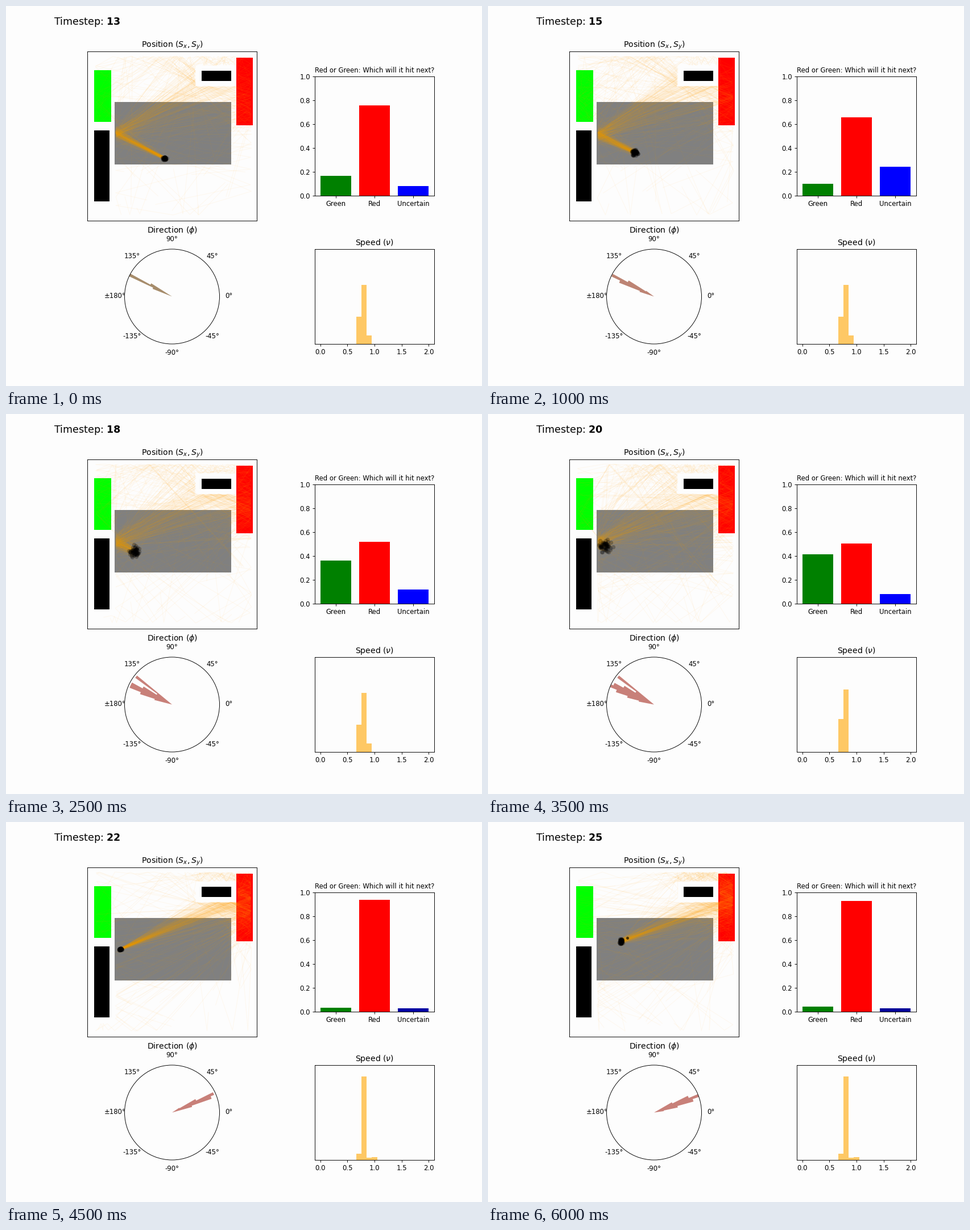
Write a matplotlib script that moves like this. It is 837 px wide and 669 px high and loops after 6500 ms.

```python
import numpy as np
import matplotlib.pyplot as plt
from matplotlib.animation import FuncAnimation
from matplotlib.collections import LineCollection
from matplotlib.patches import Circle, Polygon, Rectangle

W, H, DPI = 837, 669, 72  # at 72 dpi one point is one pixel
PT = 0.837 * 100 / 72     # size of a layout point in pixels
PAPER = "#fdfdfd"
FIRST, STEPS = 13, 13
REBOUND = 22              # first step after the ball has left the block
BIN = 3.6                 # width of a direction bin in degrees
HUB, RADIUS = np.array([292, 511.5]), 83.5

# Walls and obstacles, grown by the ball's radius.
LEFT, TOP, RIGHT, BOTTOM = 157, 88, 432, 368
BLOCKS = [(140, 202, 192, 354), (334, 105, 406, 141)]

# Key points of the predicted chances.
KEYS = [13, 15, 16, 18, 20, 22, 25]
GREEN = [.166, .102, .127, .363, .413, .031, .043]
RED = [.755, .656, .838, .520, .504, .939, .928]

plt.rcParams.update({
    "font.family": "DejaVu Sans",
    "font.size": 10 * PT,
    "axes.linewidth": 0.8 * PT,
    "axes.facecolor": PAPER,
    "xtick.major.size": 3.5 * PT, "ytick.major.size": 3.5 * PT,
    "xtick.major.width": 0.8 * PT, "ytick.major.width": 0.8 * PT,
    "xtick.major.pad": 3.5 * PT, "ytick.major.pad": 3.5 * PT,
})


def panel(x0, y0, x1, y1, xlim=None, ylim=None):
    ax = fig.add_axes([x0 / W, 1 - y1 / H, (x1 - x0) / W, (y1 - y0) / H])
    ax.set_xlim(xlim or (x0, x1))
    ax.set_ylim(ylim or (y1, y0))
    return ax


def label(x, y, text, size=10, **kw):
    return stage.text(x, y, text, fontsize=size * PT, **kw)


def box(ax, x0, y0, x1, y1, color):
    ax.add_patch(Rectangle((x0, y0), x1 - x0, y1 - y0, fc=color, lw=0, zorder=1))


def ray(deg, length):
    """Point on the dial, or offset from its hub along an angle."""
    a = np.radians(deg)
    return HUB + length * np.array([np.cos(a), -np.sin(a)])


def ball(step):
    """Centre of the cloud: in towards the left block, then back out."""
    if step < REBOUND:
        k = step - FIRST
        return np.array([279 - 10.6 * k, 268 - 5.1 * k])
    k = step - REBOUND
    return np.array([201 + 11 * k, 224 - 4.7 * k])


def cloud(step, rng, count):
    if step < REBOUND:
        spread = np.array([1.6, 1.4]) + 0.6 * (min(step, 20) - FIRST)
    else:
        spread = np.array([1.2, 0.8 + 0.5 * (step - REBOUND)])
    pos = ball(step) + rng.normal(size=(count, 2)) * spread
    pos[:, 0] = np.maximum(pos[:, 0], 194)
    return pos


def heading(step):
    """Mean direction and spread in degrees."""
    if step < REBOUND:
        k = step - FIRST
        return 152.8 + 0.4 * k, 4.2 + k
    k = step - REBOUND
    return 23.3 - 0.9 * k, 6.5 + 0.6 * k


def fan_outline(step):
    """Histogram of directions: one lobe, plus a late spike on the way in."""
    mean, width = heading(step)
    start = 129.6 if step < REBOUND else 1.2
    spike = 147 - 0.7 * (step - FIRST) if 16 <= step < REBOUND else None
    pts = [HUB]
    for edge in start + BIN * np.arange(13):
        r = RADIUS * np.exp(-((edge + BIN / 2 - mean) / width) ** 2)
        if spike and edge <= spike < edge + BIN:
            r = 80
        if r < 15:
            r = 0
        pts += [ray(a, r) for a in np.linspace(edge, edge + BIN, 4)]
    return pts


def trails(step, rng, count=170, ticks=220, pace=3):
    """Roll balls forward with noisy bounces; returns one path per ball."""
    mean, width = heading(step)
    ang = np.radians(mean + width / 1.8 * rng.standard_t(3, count))
    pos = cloud(step, rng, count)
    path = [pos]
    for _ in range(ticks):
        new = pos + pace * np.column_stack([np.cos(ang), -np.sin(ang)])
        hit_x = (new[:, 0] < LEFT) | (new[:, 0] > RIGHT)
        hit_y = (new[:, 1] < TOP) | (new[:, 1] > BOTTOM)
        for x0, y0, x1, y1 in BLOCKS:
            inside = ((new[:, 0] > x0) & (new[:, 0] < x1)
                      & (new[:, 1] > y0) & (new[:, 1] < y1))
            side = (pos[:, 0] <= x0) | (pos[:, 0] >= x1)
            hit_x |= inside & side
            hit_y |= inside & ~side
        hit = hit_x | hit_y
        ang = np.where(hit_x, np.pi - ang, ang)
        ang = np.where(hit_y, -ang, ang)
        noise = np.clip(0.13 * rng.standard_t(2, count), -1.2, 1.2)
        ang = ang + np.where(hit, noise, 0)
        pos = np.where(hit[:, None], pos, new)
        path.append(pos)
    path = np.stack(path, axis=1)
    return [p[:n] for p, n in zip(path, rng.integers(90, ticks, count))]


def stray_bundle(step, rng):
    """Balls that slip past the block, then bounce high off the top wall."""
    if not 16 <= step <= 20:
        return []
    k = step - 16
    spine = np.array([ball(step), (160, 178), (291 - 19.5 * k, 90),
                      (431 - 7 * k, 236 + 16 * k)])
    return [spine + rng.normal(size=spine.shape) * 1.5 for _ in range(4)]


def speed_shares(step):
    if step < 20:
        return .29, .62, .09, 0
    if step < REBOUND:
        return .347, .656, 0, 0
    return .066, .88, .024, .03


def fan_color(step):
    t = min((step - FIRST) / 3, 1)
    return (1 - t) * np.array([.65, .55, .42]) + t * np.array([.785, .5, .475])


fig = plt.figure(figsize=(W / DPI, H / DPI), dpi=DPI, facecolor=PAPER)

stage = panel(0, 0, W, H)
stage.axis("off")
clock = label(84.5, 32.9, "", 15)
for x, y, text, size in [(292, 72.9, "Position ($S_x, S_y$)", 12),
                         (292, 399.4, r"Direction ($\phi$)", 12),
                         (648, 116.9, "Red or Green: Which will it hit next?", 10),
                         (648, 420.9, r"Speed ($\nu$)", 12)]:
    label(x, y, text, size, ha="center")

# Direction dial
for deg in range(-135, 181, 45):
    x, y = ray(deg, 100)
    label(x, y - 0.5, "±180°" if deg == 180 else f"{deg}°", ha="center", va="center")
fan = stage.add_patch(Polygon([(0, 0), (1, 1)], lw=0, zorder=1))
stage.add_patch(Circle(HUB, RADIUS, fill=False, ec="black", lw=0.8 * PT, zorder=2))

# Arena
arena = panel(143, 80, 441, 378)
arena.set_xticks([])
arena.set_yticks([])
box(arena, 191, 169.4, 396.4, 279.4, "#808080")
box(arena, 155, 113, 185, 204, "#00ff00")
box(arena, 405, 91, 434, 210, "#ff0000")
box(arena, 155, 219, 182, 344, "black")
box(arena, 344, 114, 396.4, 132, "black")
lines = arena.add_collection(
    LineCollection([], colors="orange", alpha=0.055, linewidths=1.1, zorder=2),
    autolim=False)
dots = arena.scatter([], [], s=54, c="black", alpha=0.25, linewidths=0, zorder=3)
scout = arena.scatter([], [], s=25, c="black", alpha=0.65, linewidths=0, zorder=3)

# Prediction bars
odds = panel(543, 124, 753, 334, (-0.54, 2.54), (0, 1))
odds_bars = odds.bar(range(3), [0] * 3, color=["green", "red", "blue"])
odds.set_xticks(range(3), ["Green", "Red", "Uncertain"])
odds.set_xlim(-0.54, 2.54)

# Speed histogram
speed = panel(543, 428, 753, 595, (-0.1, 2.1), (0, 1))
speed_bars = speed.bar(np.arange(7, 11) * 2 / 21, [0] * 4, width=2 / 21,
                       align="edge", color="#fec865", lw=0)
speed.set_xticks(np.arange(0, 2.1, 0.5))
speed.set_yticks([])
speed.set_xlim(-0.1, 2.1)


def draw(i):
    step = FIRST + i
    rng = np.random.default_rng(step)
    clock.set_text(r"Timestep: $\mathbf{%d}$" % step)

    lines.set_segments(trails(step, rng) + stray_bundle(step, rng))
    dots.set_offsets(cloud(step, rng, 60))
    lead = ball(step) + np.array([2.75, -1.5]) * (step - REBOUND + 1)
    scout.set_offsets([lead] if step >= REBOUND else np.empty((0, 2)))

    fan.set_xy(fan_outline(step))
    fan.set_facecolor(fan_color(step))

    green, red = np.interp(step, KEYS, GREEN), np.interp(step, KEYS, RED)
    unsure = 1 - green - red
    for bar, h in zip(odds_bars, (green, red, unsure)):
        bar.set_height(h)
    # A very thin bar looks darker.
    odds_bars[2].set_facecolor((0, 0, np.clip(0.6 + 40 * (unsure - .029), 0, 1)))
    for bar, h in zip(speed_bars, speed_shares(step)):
        bar.set_height(h)
    return []


anim = FuncAnimation(fig, draw, frames=STEPS, interval=500, init_func=lambda: draw(0),
                     repeat=True, repeat_delay=0, blit=False)
plt.show()
```
